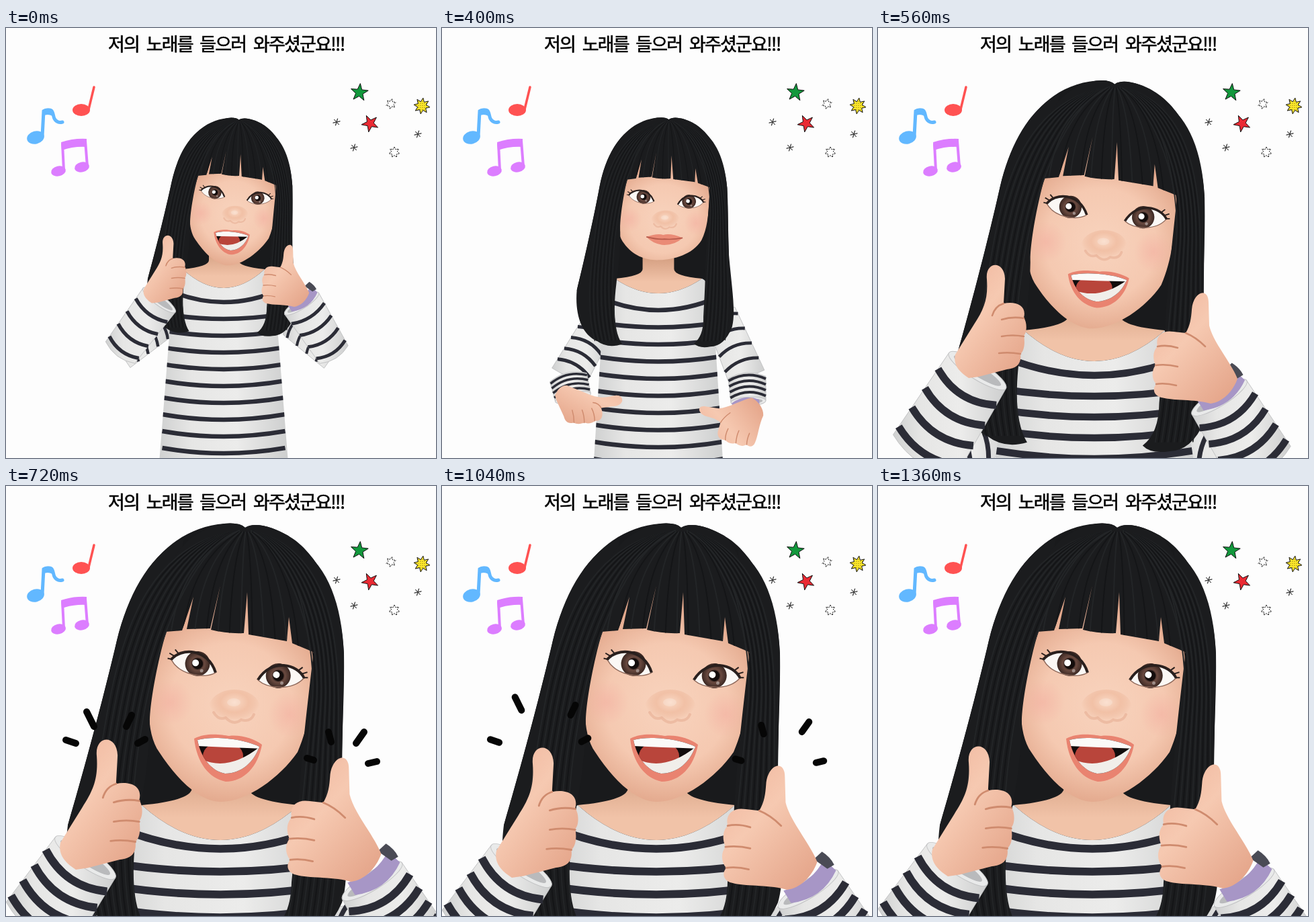
An HTML page that plays this animation: 640 px wide and 640 px high, repeating every 1440 ms.

```html
<!DOCTYPE html>
<html lang="ko">
<head>
<meta charset="utf-8">
<title>노래 인사</title>
<style>
html, body { margin: 0; width: 100%; height: 100%; overflow: hidden; background: #fdfdfd; }
svg { display: block; width: 100vw; height: 100vh; }
.title { font: 500 27px "Noto Sans CJK KR", "Noto Sans CJK", sans-serif; letter-spacing: -1.85px; word-spacing: 5px; stroke: #000; stroke-width: .6; }
</style>
</head>
<body>
<svg viewBox="0 0 640 640">
<defs>
  <radialGradient id="skin" gradientUnits="userSpaceOnUse" cx="335" cy="325" r="152">
    <stop offset="0" stop-color="#f8d3bd"/><stop offset=".6" stop-color="#f5c9b1"/><stop offset="1" stop-color="#e2a78b"/>
  </radialGradient>
  <radialGradient id="blush"><stop offset="0" stop-color="#f3a59a" stop-opacity=".42"/><stop offset="1" stop-color="#f3a59a" stop-opacity="0"/></radialGradient>
  <radialGradient id="noseTone" cx=".5" cy=".35"><stop offset="0" stop-color="#fadac6"/><stop offset=".55" stop-color="#f1bfa4" stop-opacity=".9"/><stop offset="1" stop-color="#ebb497" stop-opacity="0"/></radialGradient>
  <linearGradient id="neckTone" x2="0" y2="1"><stop offset=".3" stop-color="#cf987a"/><stop offset=".8" stop-color="#f1c3a8"/></linearGradient>
  <linearGradient id="handTone" x2=".8" y2="1"><stop offset="0" stop-color="#efb49b"/><stop offset=".45" stop-color="#f6c9b1"/><stop offset="1" stop-color="#e5a68b"/></linearGradient>
  <linearGradient id="cloth"><stop offset="0" stop-color="#cfd0d0"/><stop offset=".25" stop-color="#e6e6e5"/><stop offset=".6" stop-color="#ececeb"/><stop offset="1" stop-color="#cdcece"/></linearGradient>
  <radialGradient id="iris"><stop offset=".35" stop-color="#2b1d1a"/><stop offset=".55" stop-color="#6a4a40"/><stop offset="1" stop-color="#3a2722"/></radialGradient>
  <pattern id="dots" width="3" height="3" patternUnits="userSpaceOnUse"><path d="M0 0h3v3H0z" fill="#fbe62a"/><path d="M1 1h1v1H1z" fill="#8a7b12"/></pattern>
  <path id="bangs" d="M237 217L262 215L279 165L269 213L304 212L319 148L305 214Q328 220 354 219L359 158L361 221L418 231L421 195L426 234L462 249C470 180 455 110 420 74C400 62 370 52 356 62Q348 54 325 56C270 65 215 120 237 217Z"/>
  <clipPath id="bangsClip"><use href="#bangs"/></clipPath>
  <clipPath id="torsoClip"><path id="torsoEdge"/></clipPath>
  <clipPath id="mouthClip"><path d="M285 378C310 371 355 377 377 388C369 411 350 428 326 428C305 424 290 404 285 378Z"/></clipPath>
</defs>
<rect width="640" height="640" fill="#fdfdfd"/>
<text class="title" x="152" y="34">저의 노래를 들으러 와주셨군요!!!</text>

<g fill="#62b8ff" stroke="#62b8ff" stroke-linecap="round">
  <ellipse cx="44" cy="163" rx="13" ry="9.5" transform="rotate(-14 44 163)" stroke="none"/>
  <path d="M54 161L56 124C72 117 69 129 72 135Q76 142 84 140" fill="none" stroke-width="5"/>
  <path d="M54 122Q64 116 71 125L69 131Q62 127 55 131Z" stroke="none"/>
</g>
<g fill="#ff5252" stroke="#ff5252">
  <ellipse cx="112" cy="122" rx="13" ry="9" stroke="none"/>
  <path d="M123 121L131 88" stroke-width="3.5" stroke-linecap="round"/>
</g>
<g fill="#dc7dff" stroke="#dc7dff">
  <ellipse cx="78" cy="213" rx="11" ry="7.5" transform="rotate(-12 78 213)" stroke="none"/>
  <ellipse cx="113" cy="207" rx="11" ry="7.5" transform="rotate(-12 113 207)" stroke="none"/>
  <path d="M86 212L84 172M121 206L118 168" fill="none" stroke-width="4"/>
  <path d="M82 170Q100 164 120 165V177Q100 176 83 182Z" stroke="none"/>
</g>
<g id="stars" stroke="#111"></g>

<path id="backHair" fill="#191a1c" d="M356 62C370 52 400 62 420 74C462 98 500 165 503 250L500 420L490 540H130L92 505C114 430 144 320 165 230C190 130 245 62 325 56Q348 54 356 62Z"/>
<g id="upperArms"></g>
<path id="neck" fill="url(#neckTone)"/>
<path id="torso" fill="url(#cloth)"/>
<g id="stripes" clip-path="url(#torsoClip)" fill="none" stroke="#2b2c36"></g>

<g id="head">
  <path id="face" fill="url(#skin)"/>
  <ellipse cx="244" cy="322" rx="34" ry="34" fill="url(#blush)"/>
  <ellipse cx="422" cy="340" rx="32" ry="34" fill="url(#blush)"/>
  <g id="brows" fill="none" stroke="#2a2625" stroke-width="11" stroke-linecap="round"><path d="M240 224Q265 218 298 231M376 238Q405 230 436 236"/></g>
  <g id="eyes"></g>
  <ellipse cx="340" cy="330" rx="38" ry="27" fill="url(#noseTone)"/>
  <path d="M309 337Q316 349 327 345Q339 357 350 348Q364 352 369 340" fill="none" stroke="#d99678" stroke-width="4" stroke-linecap="round" opacity=".35"/>
  <ellipse cx="339" cy="322" rx="10" ry="6" fill="#fff" opacity=".2"/>
  <g id="smile">
    <path d="M288 371Q318 362 333 368Q352 363 384 378Q360 398 328 394Q303 389 288 371Z" fill="#ea8b76"/>
    <path d="M288 371Q318 380 335 379Q360 382 384 378" fill="none" stroke="#b65a4b" stroke-width="3"/>
  </g>
  <g id="mouth">
    <path d="M280 376C300 366 322 371 332 372C350 370 369 376 381 385C375 418 354 440 327 440C302 435 284 412 280 376Z" fill="#e98370"/>
    <g clip-path="url(#mouthClip)">
      <path d="M270 360H390V440H270Z" fill="#120c0c"/>
      <ellipse cx="323" cy="402" rx="30" ry="22" fill="#b9453b"/>
      <path d="M292 407Q332 425 378 388L366 440H290Z" fill="#f1eeea"/>
      <path d="M282 370H382V391Q330 389 285 387Z" fill="#fbfaf8"/>
    </g>
  </g>
</g>
<g id="hair" fill="#1b1c1e">
  <path d="M240 212C224 265 213 330 214 355C212 420 204 455 198 490C186 560 186 620 206 653Q168 664 140 642C98 622 84 565 92 505C114 430 144 320 165 230C182 160 215 100 265 78Z"/>
  <path d="M440 95C478 120 500 175 503 250C504 320 499 370 500 430C504 520 512 580 500 620Q478 670 440 670Q410 674 397 660Q424 640 425 590C430 540 434 500 436 460C440 400 448 330 458 246Z"/>
  <use href="#bangs"/>
  <g id="locks" fill="none" stroke-width="2"></g>
  <g id="fringe" fill="none" stroke-width="2" clip-path="url(#bangsClip)"></g>
</g>

<g id="forearms"></g>
<g id="handL">
  <path d="M162 376C159 349 188 347 189 375L187 412C205 408 222 415 217 433C222 440 222 455 217 460C219 470 218 482 212 487C214 502 206 509 192 510L150 521L135 523C124 516 111 505 115 488L143 443C158 420 164 405 162 376Z" fill="url(#handTone)"/>
  <path d="M184 436Q200 431 217 434M184 461Q200 458 217 461M180 486Q195 484 212 487M187 412Q174 416 170 430" fill="none" stroke="#cf8b6e" stroke-width="2.5" stroke-linecap="round"/>
</g>
<g id="handR">
  <path d="M467 417C469 390 492 383 492 407L493 441C499 466 525 495 535 520C528 540 512 555 495 557C470 550 440 553 422 548C410 545 408 535 414 528C407 520 407 508 413 500C408 488 410 478 416 472C412 455 425 447 440 450L458 452C465 440 466 430 467 417Z" fill="url(#handTone)"/>
  <path d="M416 472Q430 469 446 474M413 500Q430 498 446 502M414 528Q428 526 444 530M458 452Q473 458 487 472" fill="none" stroke="#cf8b6e" stroke-width="2.5" stroke-linecap="round"/>
</g>
<g id="burst" stroke="#060606" stroke-width="10" stroke-linecap="round"></g>
</svg>
<script>
const LOOP = 1440, STEP = 80;
const el = id => document.getElementById(id);
const mix = (a, b, u) => a + (b - a) * u;
const mixPose = (a, b, u) => Object.fromEntries(Object.keys(a).map(k => [k, a[k].map((v, i) => mix(v, b[k][i], u))]));

// head: x, y, scale, turn, mouth opening, brow opacity, hair shift
// body: centre, neck y, neck half width, neck depth, first stripe, stripe gap, hem half width
// arms: shoulder, elbow, wrist as x, y, half width; hands: thumb tip x, y, scale, turn
const greet = {
  head: [342.5, 249.5, .53, -1, 1, 0, 0], body: [324, 359, 61, 28, 408, 25, 97],
  armL: [235, 440, 22, 170, 483, 27, 228, 405, 30], armR: [424, 440, 20, 488, 486, 25, 440, 410, 30],
  handL: [241, 310, .6, 0], handR: [421, 322, .56, 0]
};
const rest = {
  head: [333.5, 253.5, .53, -3, 0, 1, 6], body: [322, 371, 62, 15, 405, 25, 97],
  armL: [236, 430, 24, 215, 535, 27, 205, 660, 28], armR: [408, 400, 22, 434, 535, 26, 455, 660, 31],
  handL: [230, 740, .55, 110], handR: [420, 740, .55, -110]
};
const raise = {
  head: [333.5, 255.5, .56, -2.5, 0, 0, 5], body: [322, 373, 65, 22, 420, 25.5, 97],
  armL: [228, 450, 25, 188, 520, 28, 195, 550, 27], armR: [414, 425, 24, 454, 520, 28, 456, 556, 26],
  handL: [267, 553, .58, 80], handR: [382, 568, .58, -80]
};
const lean = {
  head: [340, 275, .9, -.5, .88, 0, 4], body: [322, 450, 105, 46, 517, 31, 150],
  armL: [190, 590, 35, 70, 635, 56, 148, 510, 50], armR: [455, 600, 35, 570, 650, 52, 508, 550, 48],
  handL: [175, 355, 1, 0], handR: [481, 393, 1, 0]
};
const closeUp = lift => ({
  head: [344.5, 274.5, 1, 0, 1, 0, 0], body: [319, 475, 117, 52, 540, 34, 165],
  armL: [160, 650, 35, 50, 665 - lift, 60, 118, 565 - lift, 54], armR: [490, 660, 35, 600, 690 - lift, 58, 545, 600 - lift, 52],
  handL: [150, 392 - lift, 1.15, 0], handR: [498, 415 - lift, 1.12, 0]
});
const keys = [[80, rest], [240, rest], [400, raise], [560, lean], [720, closeUp(12)],
  [880, closeUp(0)], [1040, closeUp(0)], [1360, closeUp(2)]];

function poseAt(t) {
  if (t < STEP) return greet;
  const i = keys.findIndex(k => k[0] >= t);
  const [tb, b] = keys[i];
  if (tb === t) return b;
  const [ta, a] = keys[i - 1];
  return mixPose(a, b, (t - ta) / (tb - ta));
}

const place = (id, [x, y, s, r], ox, oy) =>
  el(id).setAttribute("transform", `translate(${x} ${y}) rotate(${r}) scale(${s}) translate(${-ox} ${-oy})`);

// Striped sleeve section; stripes sag towards the first end.
function limb(ax, ay, aw, bx, by, bw) {
  const len = Math.hypot(bx - ax, by - ay) || 1, dx = (bx - ax) / len, dy = (by - ay) / len;
  const side = (u, k) => {
    const w = mix(aw, bw, u) * k;
    return [mix(ax, bx, u) + dy * w, mix(ay, by, u) - dx * w];
  };
  const sag = u => [mix(ax, bx, u) - dx * aw * .5, mix(ay, by, u) - dy * aw * .5];
  const thick = Math.min(.2 * aw, len / 9);
  let s = `<path d="M${side(0, -1)}Q${sag(0)} ${side(0, 1)}L${side(1, 1)}L${side(1, -1)}Z" fill="url(#cloth)" stroke="#c2c3c4" stroke-width="1" stroke-linejoin="round"/>`;
  for (let i = 0; i < 4; i++) {
    const u = .1 + i * .235;
    s += `<path d="M${side(u, -1)}Q${sag(u)} ${side(u, 1)}" fill="none" stroke="#2b2c36" stroke-width="${thick}"/>`;
  }
  return s;
}

const atWrist = ([, , , ex, ey, , x, y]) =>
  `translate(${x} ${y}) rotate(${Math.atan2(y - ey, x - ex) * 180 / Math.PI + 90})`;

function cuff(arm) {
  const w = arm[8];
  return `<g transform="${atWrist(arm)}"><ellipse rx="${w}" ry="${w * .26}" fill="#e9eaea" stroke="#c2c3c4"/><ellipse rx="${w * .82}" ry="${w * .16}" fill="#b9babc"/></g>`;
}

function watch(arm) {
  return `<g transform="${atWrist(arm)} scale(${arm[8] / 48})"><path d="M-30 4Q10 22 46 -2L40 -24Q10 -4 -30 -16Z" fill="#a796c6"/><path d="M28 -31L43 -34Q49 -22 48 -10L37 -10Z" fill="#4a4b55"/></g>`;
}

function drawBody([cx, y, hw, d, first, gap, hem]) {
  const p = (k, yy) => `${cx + k * hw} ${yy}`;
  const dip = `Q${p(0, y + 2 * d)} ${p(1, y)}`;
  const n = .36, low = y - .22 * hw, top = y - hw;
  el("neck").setAttribute("d", `M${p(-n, top)}L${p(-n, low)}Q${p(-n, y - .06 * hw)} ${p(-1, y)}${dip}Q${p(n, y - .06 * hw)} ${p(n, low)}L${p(n, top)}Z`);
  const edge = `M${p(-1, y)}${dip}Q${p(1.25, y + .1 * hw)} ${p(1.27, y + .9 * hw)}L${cx + hem} 660H${cx - hem}L${p(-1.27, y + .9 * hw)}Q${p(-1.25, y + .1 * hw)} ${p(-1, y)}Z`;
  el("torso").setAttribute("d", edge);
  el("torsoEdge").setAttribute("d", edge);
  let s = "";
  for (let i = 0, yy = first; yy < 660; i++, yy += gap) {
    const bend = hw * (i ? .13 : .36);
    s += `<path d="M${p(-1.5, yy - bend)}Q${p(0, yy + bend)} ${p(1.5, yy - bend)}" stroke-width="${gap * (hw > 90 ? .34 : .26)}"/>`;
  }
  el("stripes").innerHTML = s;
}

function drawHead([x, y, s, r, open, brow, shift]) {
  const spot = [x, y, s, r], chin = 434 + 36 * open, jaw = 386 + 10 * open;
  place("head", spot, 344.5, 274.5);
  for (const id of ["hair", "backHair"]) place(id, spot, 344.5 - shift, 274.5);
  el("face").setAttribute("d", `M232 150L222 270C208 320 210 ${jaw - 25} 228 ${jaw}C250 ${jaw + 34} 285 ${chin} 320 ${chin}C358 ${chin} 408 ${jaw + 38} 434 ${jaw}C454 350 458 300 462 240L440 150Z`);
  el("brows").setAttribute("opacity", brow);
  const wide = open > .25;
  el("mouth").setAttribute("visibility", wide ? "visible" : "hidden");
  el("smile").setAttribute("visibility", wide ? "hidden" : "visible");
  el("mouth").setAttribute("transform", `translate(0 370) scale(1 ${open}) translate(0 -370)`);
}

// Ray ends near the thumbs, then the drift over 320 ms.
const rays = [
  [120, 336, 131, 358, -12, -23], [187, 341, 179, 358, 12, -16], [89, 378, 104, 383, -18, -1], [196, 383, 207, 377, 11, -2],
  [480, 366, 484, 381, -5, -11], [533, 366, 521, 383, 14, -16], [448, 405, 458, 408, -12, 1], [539, 413, 552, 410, 17, -1]
];
function drawBurst(t) {
  const u = (t - 720) / 320, trim = .06 * u;
  el("burst").innerHTML = t < 720 || t > 1120 ? "" : rays.map(([a, b, c, d, dx, dy]) =>
    `<path d="M${mix(a, c, trim) + dx * u} ${mix(b, d, trim) + dy * u}L${mix(c, a, trim) + dx * u} ${mix(d, b, trim) + dy * u}"/>`).join("");
}

function draw(t) {
  const p = poseAt(t);
  drawHead(p.head);
  drawBody(p.body);
  el("upperArms").innerHTML = [p.armL, p.armR].map(a => limb(...a.slice(0, 6))).join("");
  el("forearms").innerHTML = [p.armL, p.armR].map(a => limb(...a.slice(3)) + cuff(a)).join("") + watch(p.armR);
  place("handL", p.handL, 175, 357);
  place("handR", p.handR, 481, 391);
  drawBurst(t);
}

function star(x, y, n, R, r, turn, fill, extra = "") {
  const pts = Array.from({ length: n * 2 }, (_, i) => {
    const a = turn + i * Math.PI / n, q = i % 2 ? r : R;
    return [x + q * Math.sin(a), y - q * Math.cos(a)].map(v => v.toFixed(1));
  });
  return `<polygon points="${pts.join(" ")}" fill="${fill}" ${extra}/>`;
}
const dash = 'stroke-dasharray="2 1"';
el("stars").innerHTML = star(526, 96, 5, 13.5, 5.5, .1, "#12983c") + star(542, 142, 5, 13, 5.2, -.45, "#ea2a33") +
  star(619, 116, 8, 12, 6.5, .15, "url(#dots)") + star(573, 113, 6, 7.5, 4, .2, "#fff", dash) + star(578, 185, 7, 8, 4.5, 0, "#fff", dash) +
  [[492, 140], [613, 158], [518, 178]].map(([x, y]) => star(x, y, 6, 5.5, .4, .3, "none", 'stroke-width=".7"')).join("");

function eye(x, y, turn, flip, ix) {
  return `<g transform="translate(${x} ${y}) rotate(${turn}) scale(${flip} 1)">
    <path d="M-34 -3C-22 -22 18 -25 33 10C16 21 -20 18 -34 -3Z" fill="#fbf8f5"/>
    <circle cx="${ix}" cy="-1" r="18.5" fill="url(#iris)"/><circle cx="${ix}" cy="-1" r="8" fill="#140d0c"/>
    <circle cx="${ix - 3 * flip}" cy="-2" r="5" fill="#fff"/><circle cx="${ix + 7 * flip}" cy="9" r="2.5" fill="#fff" opacity=".4"/>
    <path d="M-35 -3C-22 -23 18 -26 33 10" fill="none" stroke="#2a201e" stroke-width="4"/>
    <path d="M-33 -4L-40 -5M-30 -9L-38 -13M-24 -13L-30 -19" stroke="#2a201e" stroke-width="2"/>
    <path d="M-34 -3C-20 18 16 21 33 10" fill="none" stroke="#8f6a5c" stroke-width="1.5"/></g>`;
}
el("eyes").innerHTML = eye(280, 265, 5, 1, 5) + eye(409, 284, 9, -1, 4);

let locks = "", fringe = "";
for (let i = 0; i < 13; i++) {
  const u = i / 12, tone = i % 2 ? "#141517" : "#232527";
  locks += `<g stroke="${tone}"><path d="M348 66C${mix(220, 290, u)} 84 ${mix(176, 232, u)} 200 ${mix(152, 207, u)} 330S${mix(114, 183, u)} 560 ${mix(134, 194, u)} 642"/>` +
    `<path d="M364 66C${mix(470, 405, u)} 90 ${mix(496, 468, u)} 200 ${mix(495, 455, u)} 330S${mix(498, 434, u)} 560 ${mix(480, 418, u)} 655"/></g>`;
  fringe += `<path stroke="${tone}" d="M${mix(345, 368, u)} 68Q${mix(262, 440, u)} 110 ${mix(246, 453, u)} ${mix(215, 250, u)}"/>`;
}
el("locks").innerHTML = locks;
el("fringe").innerHTML = fringe;

let start = null, shown = -1;
function tick(now) {
  start ??= now;
  const t = Math.floor(((now - start) % LOOP) / STEP) * STEP;
  if (t !== shown) draw(shown = t);
  requestAnimationFrame(tick);
}
draw(0);
requestAnimationFrame(tick);
</script>
</body>
</html>
```
